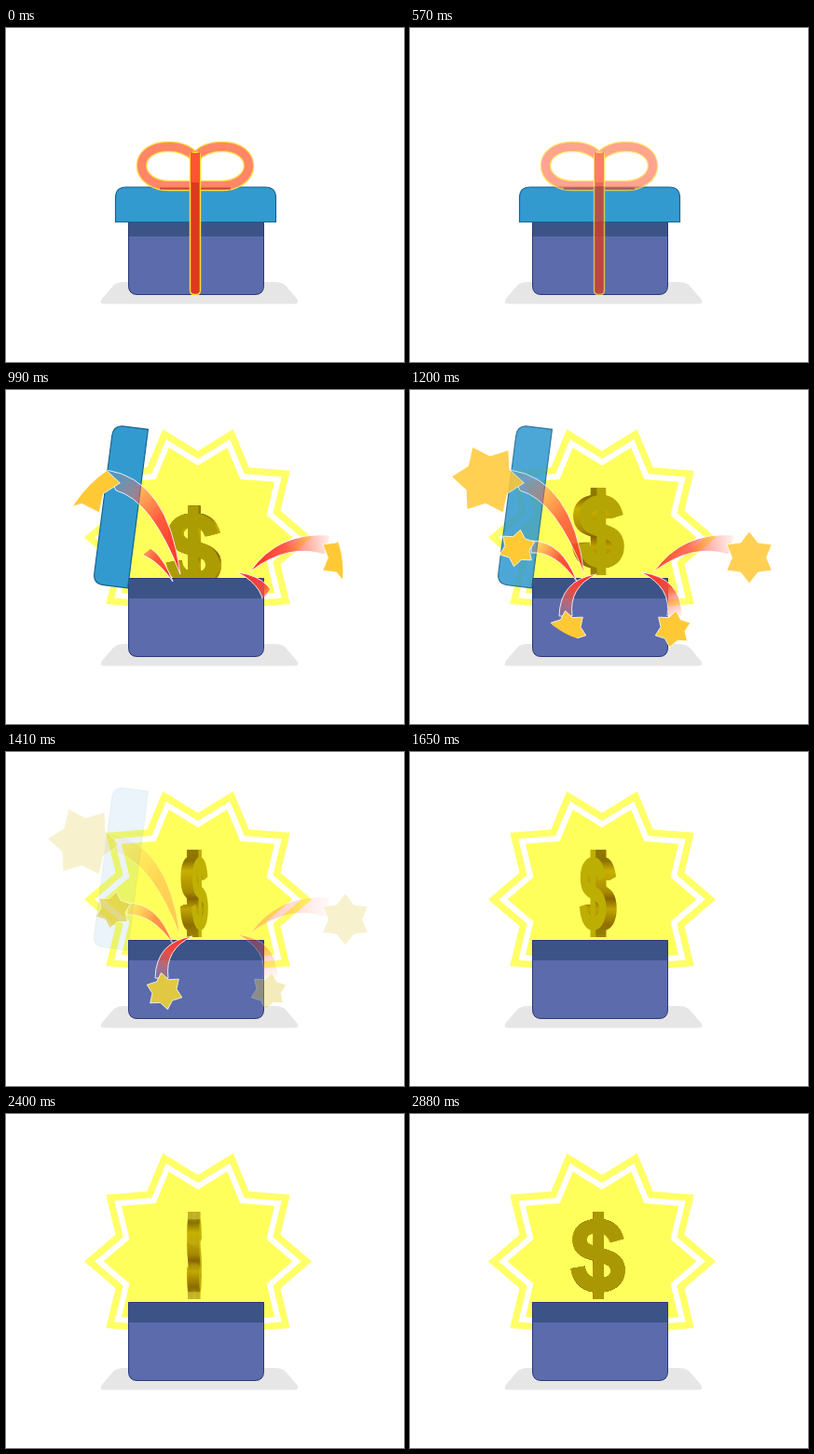
Animation of 427x359 px, one loop 2.91 s. Source, as an HTML page:

```html
<!DOCTYPE html>
<html lang="en">
<head>
<meta charset="utf-8">
<title>Gift box</title>
<style>
  html, body { margin: 0; width: 100%; height: 100%; overflow: hidden; background: #fff; }
  svg { display: block; width: 427px; height: 359px; }
</style>
</head>
<body>
<svg id="stage" viewBox="0 0 427 359">
  <defs>
    <linearGradient id="gold" gradientUnits="userSpaceOnUse" x1="0" y1="-47" x2="0" y2="47">
      <stop offset="0" stop-color="#927a00"/>
      <stop offset=".13" stop-color="#8c7200"/>
      <stop offset=".24" stop-color="#c8b000"/>
      <stop offset=".48" stop-color="#a88c00"/>
      <stop offset=".56" stop-color="#866400"/>
      <stop offset=".68" stop-color="#c0a400"/>
      <stop offset=".86" stop-color="#8e6e00"/>
      <stop offset="1" stop-color="#9c8400"/>
    </linearGradient>
    <g id="dollar" fill="none">
      <path d="M0 -47V47" stroke-width="11.5"/>
      <path d="M20 -16C17 -27 10 -31.500 0 -31.500C-12 -31.500 -20 -26 -20 -17C-20 -6 -11 -4 0 -1C13 2 21 6 21 16C21 27 12 32 0 32C-12 32 -20 26 -22 13" stroke-width="15"/>
    </g>
    <clipPath id="aboveBox"><path d="M0 0H427V203H0z"/></clipPath>
  </defs>

  <path d="M127 273H288Q296 273 300 277L312 291Q316 296.500 309 296.500H106Q99 296.500 103 291L115 277Q119 273 127 273z" fill="#e6e6e6"/>

  <g id="burst" transform="translate(206 158.400)">
    <path id="burstFill" fill="#ff6"/>
    <path id="burstLine" fill="#ffff5c" stroke-miterlimit="10"/>
  </g>

  <g clip-path="url(#aboveBox)"><g id="sign"></g></g>

  <path d="M131.500 202.500H276.500V277Q276.500 286.500 267 286.500H141Q131.500 286.500 131.500 277z" fill="#5b6bac"/>
  <path d="M131.500 202.500H276.500V224H131.500z" fill="#3c5387"/>
  <path d="M131.500 202.500H276.500V277Q276.500 286.500 267 286.500H141Q131.500 286.500 131.500 277z" fill="none" stroke="#2a3978"/>

  <g id="lid">
    <path d="M.5 -.5V-26.500Q.5 -38 12 -38H161Q172.500 -38 172.500 -26.500V-.5z" fill="#339ad0" stroke="#18658f" stroke-width="1.200"/>
  </g>

  <g id="flyers"></g>

  <g id="ribbon">
    <g id="bow" fill="none"></g>
    <path d="M165 172.500H241" stroke="#c9473a" stroke-width="2"/>
    <path d="M197.500 138Q197.500 132 203 134Q208.500 132 208.500 138V282Q208.500 286.500 204 286.500H202Q197.500 286.500 197.500 282z" fill="#de3a1e" stroke="#ffd83a" stroke-width="1.500"/>
    <path d="M198 133L203 136L208 133V166H198z" fill="#ff5431"/>
  </g>
</svg>
<script>
const LOOP = 2910, STEP = 30, SLICES = 15;
const $ = id => document.getElementById(id);
const clamp = v => Math.max(0, Math.min(1, v));
const span = (t, a, b) => clamp((t - a) / (b - a));
const mix = (a, b, k) => a + (b - a) * k;
const blend = (from, to, k) => `rgb(${from.map((v, i) => Math.round(mix(v, to[i], k)))})`;

function add(parent, tag, attrs) {
  const el = document.createElementNS('http://www.w3.org/2000/svg', tag);
  for (const key in attrs) el.setAttribute(key, attrs[key]);
  parent.appendChild(el);
  return el;
}

function starPath(points, outer, inner, turn = 0, cx = 0, cy = 0) {
  let d = '';
  for (let i = 0; i < points * 2; i++) {
    const a = turn * Math.PI / 180 + i * Math.PI / points;
    const r = i % 2 ? inner : outer;
    d += (i ? 'L' : 'M') + (cx + r * Math.cos(a)).toFixed(2) + ' ' + (cy + r * Math.sin(a)).toFixed(2);
  }
  return d + 'z';
}

// Two mirrored ribbon loops, yellow rim below the red band
const loop = 'M203 139C195 130 185 127.500 174 127.500C156 127.500 145.500 137 145.500 148C145.500 160 158 169.500 175 169.500H203.500';
for (const [stroke, width] of [['#ffd83a', 11.5], ['#ff8667', 9]]) {
  for (const transform of ['', 'matrix(-1 0 0 1 406 0)']) {
    add($('bow'), 'path', { d: loop, stroke, 'stroke-width': width, transform });
  }
}

// Each flyer is uncovered by a circle growing from its base, then fades
const flyers = [
  { base: [187, 198], tail: 'Q174 96 108 86L118 108Q156 118 187 198z', star: [83.5, 96.5, 39, 5],
    reach: 185, show: [850, 1040], fade: [1150, 1500] },
  { base: [262, 195], tail: 'Q292 152 348 156L342 177Q303 164 262 195z', star: [364, 180, 28, -90],
    reach: 135, show: [850, 1040], fade: [1150, 1500] },
  { base: [179, 206], tail: 'Q163 162 130 162L130 175Q156 173 179 206z', star: [115, 170, 20, -80],
    reach: 95, show: [900, 1100], fade: [1300, 1600] },
  { base: [248, 196], tail: 'Q291 201 292 243L276 243Q281 212 248 196z', star: [282, 257, 20, -80],
    reach: 105, show: [900, 1140], fade: [1200, 1530] },
  { base: [200, 198], tail: 'Q161 204 160 243L174 243Q170 212 200 198z', star: [170, 257, 20, -100],
    reach: 90, show: [1040, 1240], fade: [1410, 1620] }
];
flyers.forEach((f, i) => {
  const [bx, by] = f.base, [cx, cy, r, turn] = f.star;
  const defs = add($('stage'), 'defs', {});
  const clip = add(defs, 'clipPath', { id: 'reveal' + i });
  f.circle = add(clip, 'circle', { cx: bx, cy: by, r: 0 });
  const grad = add(defs, 'linearGradient', {
    id: 'tail' + i, gradientUnits: 'userSpaceOnUse', x1: bx, y1: by, x2: cx, y2: cy
  });
  add(grad, 'stop', { offset: 0, 'stop-color': '#ff2a2a' });
  add(grad, 'stop', { offset: .4, 'stop-color': '#ff4a3a', 'stop-opacity': .9 });
  add(grad, 'stop', { offset: .9, 'stop-color': '#ff8a70', 'stop-opacity': .1 });
  f.group = add($('flyers'), 'g', { 'clip-path': `url(#reveal${i})` });
  add(f.group, 'path', {
    d: `M${bx} ${by}${f.tail}`, fill: `url(#tail${i})`, stroke: '#fff', 'stroke-opacity': .85
  });
  f.shape = add(f.group, 'path', {
    d: starPath(6, r, r * .66, turn, cx, cy), stroke: '#fff', 'stroke-opacity': .8
  });
});

const slices = Array.from({ length: SLICES }, () => add($('sign'), 'use', {
  href: '#dollar', stroke: 'url(#gold)'
}));

function drawBurst(t) {
  const k = span(t, 600, 868);
  $('burst').style.display = k ? '' : 'none';
  const outer = 122 * k, line = outer * mix(1.08, .87, k);
  const grey = Math.round(255 * k ** 1.5);
  $('burstFill').setAttribute('d', starPath(10, outer, outer * .762));
  $('burstLine').setAttribute('d', starPath(10, line, line * .762));
  $('burstLine').setAttribute('stroke', `rgb(${grey},${grey},${grey})`);
  $('burstLine').setAttribute('stroke-width', 6.2 * k ** 1.6);
}

function drawSign(t) {
  const rise = span(t, 870, 1020);
  $('sign').style.display = rise ? '' : 'none';
  $('sign').setAttribute('transform', `translate(202 ${152 + 97 * (1 - rise)})`);
  const angle = (t - 1042) / 915 * Math.PI;
  const cos = Math.cos(angle), sin = Math.sin(angle);
  const width = Math.max(.03, Math.abs(cos));
  const shift = 6.5 * sin * Math.sign(cos);
  slices.forEach((slice, i) => {
    const x = shift * (2 * i / (SLICES - 1) - 1);
    slice.setAttribute('transform', `translate(${x} 0) scale(${width} 1)`);
  });
  slices[SLICES - 1].setAttribute('stroke', blend([168, 151, 4], [192, 178, 4], Math.abs(sin)));
}

function draw(t) {
  $('ribbon').setAttribute('opacity', 1 - span(t, 540, 660));

  drawBurst(t);
  drawSign(t);

  const open = span(t, 630, 912);
  const lift = Math.sin(open * Math.PI / 2);
  $('lid').setAttribute('transform',
    `translate(${mix(117, 131, open)} ${mix(209, 213.5, lift)}) rotate(${-82.7 * open})`);
  $('lid').setAttribute('opacity', 1 - span(t, 1165, 1437));

  const starColor = blend([255, 201, 54], [219, 200, 68], span(t, 1200, 1440));
  for (const f of flyers) {
    f.circle.setAttribute('r', f.reach * span(t, ...f.show));
    f.shape.setAttribute('fill', starColor);
    f.group.setAttribute('opacity', 1 - span(t, ...f.fade));
  }
}

const start = performance.now();
function frame() {
  const t = (performance.now() - start) % LOOP;
  draw(Math.floor(t / STEP) * STEP);
  requestAnimationFrame(frame);
}
draw(0);
requestAnimationFrame(frame);
</script>
</body>
</html>
```
